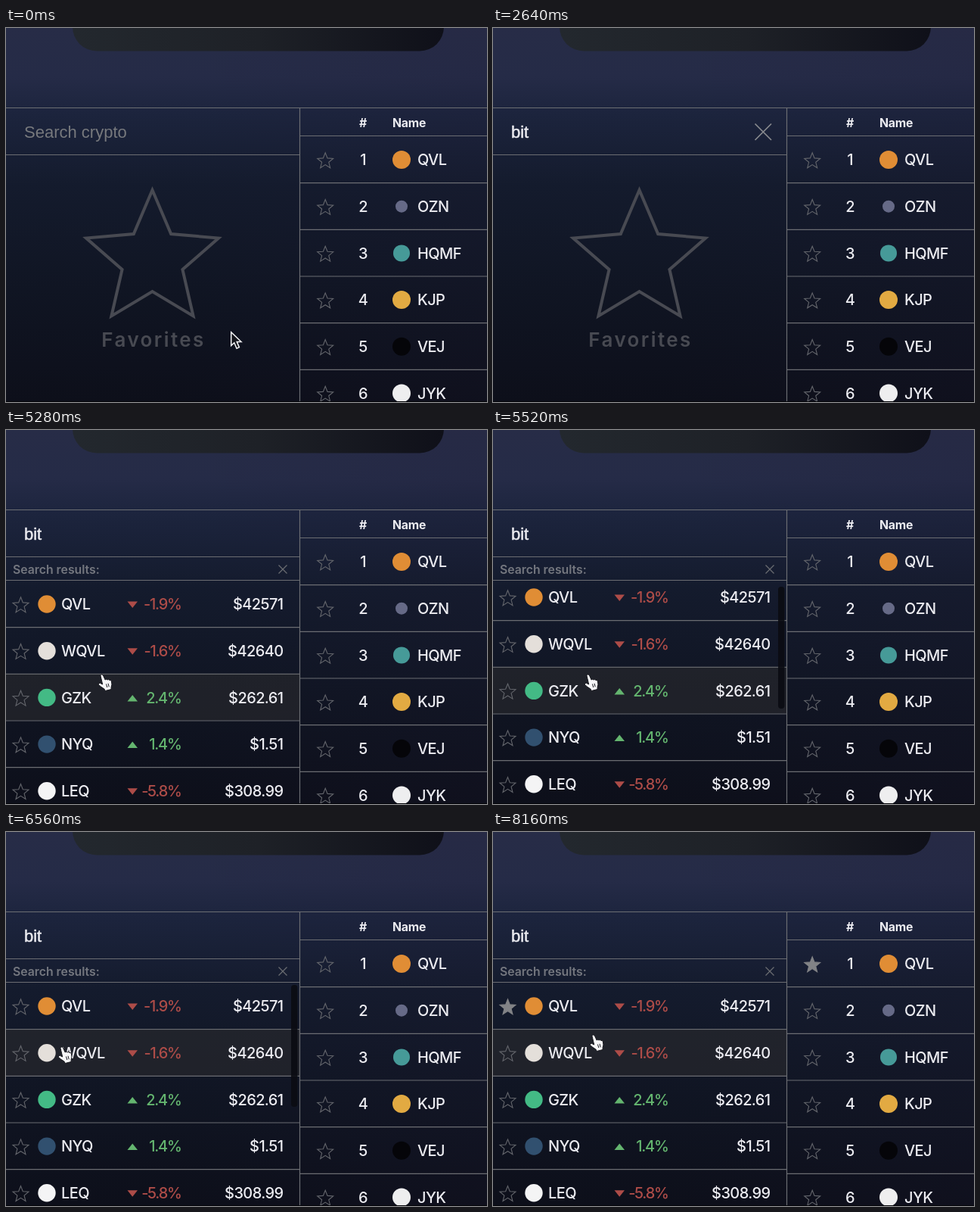
Write an HTML page that moves like this. It is 636x494 px and loops after 9.2 s.

```html
<!DOCTYPE html>
<html lang="en">
<head>
<meta charset="utf-8">
<title>Crypto search</title>
<style>
  html, body { margin: 0; width: 100%; height: 100%; overflow: hidden; background: #101423; }
  svg { display: block; width: 100vw; height: 100vh; }
  text { font: 500 20px Inter, sans-serif; letter-spacing: -.6px; fill: #ececf1; white-space: pre; }
  .input { font: 400 22px "Liberation Sans", Arial, sans-serif; letter-spacing: 0; }
  .head { font-weight: 700; font-size: 15.8px; letter-spacing: -.2px; }
  .label { font-weight: 600; font-size: 15.8px; letter-spacing: 0; fill: #74777f; }
  .fav { font-weight: 600; font-size: 26px; letter-spacing: 2.4px; fill: #484a52; }
  .percent { letter-spacing: -1.3px; }
  .end { text-anchor: end; }
  .mid { text-anchor: middle; }
  .line { stroke: #6b6d72; stroke-width: 1.2; fill: none; }
  .star { fill: none; stroke: #64666c; stroke-width: 1.1; }
  .up { fill: #64b56f; }
  .down { fill: #ad4c48; }
</style>
</head>
<body>
<svg viewBox="0 0 636 494" preserveAspectRatio="none">
  <defs>
    <linearGradient id="page" x2="0" y2="1">
      <stop offset="0" stop-color="#272c47"/>
      <stop offset=".13" stop-color="#252b47"/>
      <stop offset=".23" stop-color="#1c243d"/>
      <stop offset=".42" stop-color="#141b2d"/>
      <stop offset=".7" stop-color="#101523"/>
      <stop offset="1" stop-color="#0d0f1a"/>
    </linearGradient>
    <linearGradient id="tint">
      <stop offset=".4" stop-color="#221a36" stop-opacity="0"/>
      <stop offset="1" stop-color="#221a36" stop-opacity=".13"/>
    </linearGradient>
    <linearGradient id="card">
      <stop offset="0" stop-color="#23282e"/>
      <stop offset=".5" stop-color="#1e2127"/>
      <stop offset="1" stop-color="#0f1019"/>
    </linearGradient>
    <clipPath id="list"><rect y="199" width="388" height="295"/></clipPath>
  </defs>
  <rect width="636" height="494" fill="url(#page)"/>
  <rect width="636" height="494" fill="url(#tint)"/>
  <rect x="88" y="-70" width="491" height="100.500" rx="32" fill="url(#card)"/>
  <g id="market"></g>

  <g id="favorites"></g>
  <g id="results">
    <text class="label" x="9" y="189.500">Search results:</text>
    <path class="line" d="M360.500 178.500l11 11m0-11l-11 11M0 198.500h388"/>
    <g clip-path="url(#list)">
      <g id="rows"></g>
      <rect id="thumb" x="377" width="8.500" height="161" rx="4" fill="#0b0c12"/>
    </g>
  </g>

  <path class="line" d="M0 105.500H636M388.500 105.500V494M0 167.500H388M389 142.500H636"/>
  <text id="query" class="input" x="24" y="145" stroke-width=".5"></text>
  <path id="clear" d="M346.500 126.500l21.500 21.500m0-21.500l-21.500 21.500" stroke="#898b8f" stroke-width="1.700"/>
  <rect id="caret" y="125" width="1.500" height="25" fill="#f1f1f5"/>
  <rect y="493" width="636" height="1" fill="#05060a"/>

  <g id="cursor">
    <path id="arrow" d="M.7.700V18.500L4.800 14.700 8 22.200 11.400 20.700 8.200 13.400H14Z" fill="#14151c" stroke="#f4f4f6" stroke-width="1.500"/>
    <path id="beam" d="M-3.500-8.500Q0-8.500 0-6V6Q0 8.500-3.500 8.500M3.500-8.500Q0-8.500 0-6V6Q0 8.500 3.500 8.500" fill="none" stroke="#dcdde2" stroke-width="1.300"/>
    <g id="hand" transform="translate(-1.500 -3)" stroke="#15161c" stroke-linejoin="round">
      <path d="M-1.600 1.200Q-.2-1.200 1.800.8L4.600 7Q6.300 5.500 7.600 7 9.400 5.800 10.400 7.500 12.300 6.800 12.900 9 14.200 13.500 12.600 16.500V19.500L4.800 21.500 3.400 19Q-1 16.500-4 13.500-4.800 10.800-2 11.300L1.200 13Z" fill="#f6f6f8"/>
      <path d="M6 12.500l1.300 4.500M8.500 11.800l1.200 4.500" fill="none"/>
    </g>
  </g>
</svg>
<script>
const LOOP = 9200, STEP = 80, PITCH = 61.7;
const $ = id => document.getElementById(id);
const show = (id, on) => $(id).setAttribute('visibility', on ? 'visible' : 'hidden');
const clamp = v => Math.min(1, Math.max(0, v));

function star(cx, cy, outer, inner) {
  return Array.from({ length: 10 }, (_, i) => {
    const r = i % 2 ? inner : outer, a = i * Math.PI / 5 - Math.PI / 2;
    return (cx + r * Math.cos(a)).toFixed(2) + ',' + (cy + r * Math.sin(a)).toFixed(2);
  }).join(' ');
}
const smallStar = (x, y, id) =>
  `<polygon id="${id}" class="star" points="${star(x, y, 11, 4.8)}"/>`;
const dot = (x, y, color, r = 12) => `<circle cx="${x}" cy="${y}" r="${r}" fill="${color}"/>`;

const market = [
  ['QVL', '#e08d35'], ['OZN', '#666a87', 8], ['HQMF', '#469a98', 11],
  ['KJP', '#e2aa42'], ['VEJ', '#050509'], ['JYK', '#eeeeef']
];
const found = [
  ['QVL', '#e08d35', -1.9, '$42571'], ['WQVL', '#e4dfda', -1.6, '$42640'],
  ['GZK', '#43ba85', 2.4, '$262.61'], ['NYQ', '#31506f', 1.4, '$1.51'],
  ['LEQ', '#f4f4f5', -5.8, '$308.99'], ['KZV', '#dfa039', 19.4, '$89.13'],
  ['HUJ', '#8b8fa0', -2.1, '$0.42']
];

$('market').innerHTML =
  '<text class="head mid" x="472" y="130.500">#</text><text class="head" x="511" y="130.500">Name</text>' +
  market.map(([name, color, r], i) => {
    const y = 174 + i * PITCH;
    return smallStar(422.2, y + 1.8, 'market' + i) + dot(523, y, color, r) +
      `<text class="mid" x="472" y="${y + 7.3}">${i + 1}</text>
       <text x="544" y="${y + 7.3}">${name}</text>
       <path class="line" d="M389 ${y + 30.6}H636"/>`;
  }).join('');

$('favorites').innerHTML =
  `<polygon points="${star(193.5, 306, 92, 42)}" fill="none" stroke="#484a52" stroke-width="4"/>
   <text class="fav mid" x="195" y="420.500">Favorites</text>`;

$('rows').innerHTML = found.map(([name, color, change, price], i) => {
  const y = 230 + i * PITCH, kind = change > 0 ? 'up' : 'down';
  const tri = change > 0 ? `M160.500 ${y + 5}h13.5l-6.750-8.500z` : `M160.500 ${y - 3.5}h13.5l-6.750 8.500z`;
  return `<rect id="row${i}" y="${y - 30.6}" width="388" height="${PITCH - 1}" fill="#2b2b2d" opacity=".6"/>` +
    smallStar(19.5, y + 1.8, 'found' + i) + dot(54, y, color, 11.7) +
    `<text x="73" y="${y + 7.3}">${name}</text>
     <path class="${kind}" d="${tri}"/>
     <text class="end percent ${kind}" x="231.500" y="${y + 7.3}">${change}%</text>
     <text class="end" x="366.500" y="${y + 7.3}">${price}</text>
     <path class="line" d="M0 ${y + 30.6}H388"/>`;
}).join('');

// Each key is [time, value, value, ...]; values are linear in between.
function track(keys, t) {
  const i = keys.findIndex(k => k[0] > t);
  if (i === 0) return keys[0].slice(1);
  if (i < 0) return keys[keys.length - 1].slice(1);
  const a = keys[i - 1], b = keys[i], p = (t - a[0]) / (b[0] - a[0]);
  return a.slice(1).map((v, j) => v + (b[j + 1] - v) * p);
}
const pointer = [
  [0, 297, 401], [80, 288, 385], [240, 220, 265], [400, 147, 148], [480, 141, 138],
  [4480, 141, 138], [4640, 150, 190], [4880, 154, 365], [4960, 150, 385],
  [5200, 130, 332], [5280, 128, 326], [5440, 127, 326], [6400, 127, 326],
  [6480, 106, 312], [6560, 75, 287], [6720, 37, 250], [6880, 23, 235], [7120, 18, 229],
  [7440, 18, 229], [7600, 38, 240], [7840, 98, 264], [8000, 124, 271], [8160, 134, 271]
];
const scrolling = [
  [5440, 0], [5600, 18], [5760, 54], [5920, 86.5], [6000, 91], [6080, 80], [6240, 20], [6320, 0]
];
const typing = [[2160, 'bit', 47], [1920, 'bi', 41.5], [1440, 'b', 36], [0, '', 24.3]];
const within = (t, spans) => spans.some(([a, b]) => t >= a && t < b);

function draw(time) {
  const t = Math.floor(time / STEP) * STEP;

  const [, typed, caretX] = typing.find(k => t >= k[0]);
  $('query').textContent = typed || 'Search crypto';
  $('query').style.fill = typed ? '' : '#77797d';
  $('query').style.stroke = typed ? '#ececf1' : 'none';
  $('caret').setAttribute('x', caretX);
  show('caret', within(t, [[720, 1200], [1440, 2640]]));
  show('clear', within(t, [[1440, 3200]]));

  const reveal = clamp((t - 3120) / 320);
  $('favorites').setAttribute('opacity', 1 - reveal);
  $('results').setAttribute('opacity', reveal);

  const [scroll] = track(scrolling, t);
  $('rows').setAttribute('transform', `translate(0 ${-scroll})`);
  $('thumb').setAttribute('y', 202 + scroll * 0.543);
  $('thumb').setAttribute('opacity', t < 5520 ? 0 : 0.9 * clamp((7040 - t) / 320));

  const [x, y] = track(pointer, t);
  const inField = y < 167, onRows = t >= 4560 && y >= 199;
  $('cursor').setAttribute('transform', `translate(${x} ${y})`);
  const visible = t < 1440 || t >= 4560;
  show('beam', visible && inField);
  show('hand', visible && onRows);
  show('arrow', visible && !inField && !onRows);
  const hovered = onRows ? Math.floor((y - 199) / PITCH) : -1;
  found.forEach((_, i) => show('row' + i, i === hovered));

  const marked = clamp((t - 7200) / 160);
  for (const id of ['market0', 'found0']) {
    $(id).style.fill = `rgba(130,131,134,${marked})`;
    $(id).style.stroke = marked ? '#828386' : '';
  }
}

const start = performance.now();
function frame() {
  draw((performance.now() - start) % LOOP);
  requestAnimationFrame(frame);
}
frame();
</script>
</body>
</html>
```
